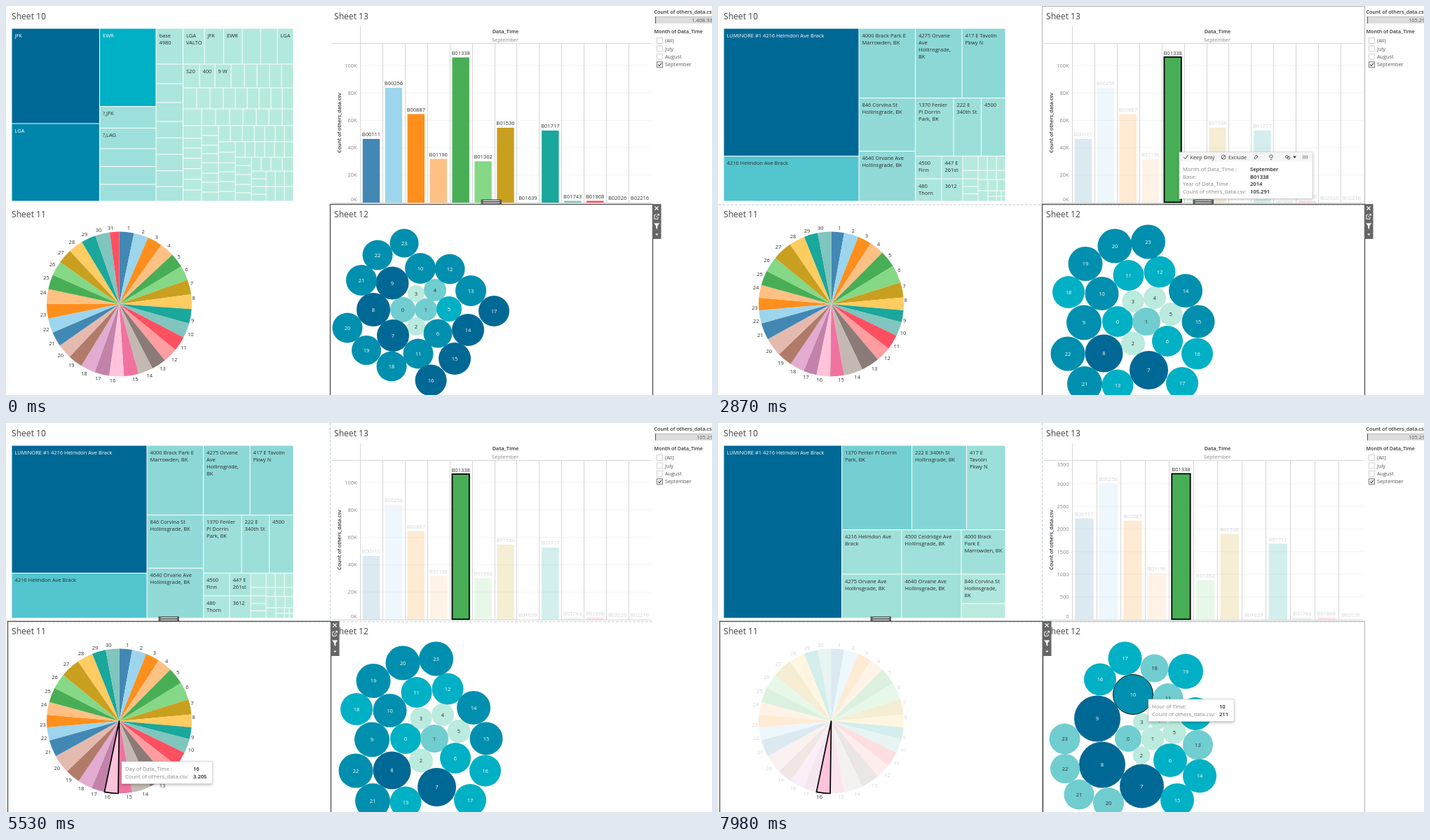
An HTML page with a canvas for the animation above (8 s loop, 1007 px wide and 556 px high).

```html
<!DOCTYPE html>
<html lang="en">
<head>
<meta charset="utf-8">
<title>Dashboard</title>
<style>
html, body { margin: 0; width: 100%; height: 100%; overflow: hidden; background: #fff; }
canvas { display: block; }
</style>
</head>
<body>
<canvas id="stage" width="1007" height="556"></canvas>
<script>
const g = document.getElementById('stage').getContext('2d');
const FONT = '"Open Sans", "Noto Sans", sans-serif';
const PAL = ['#4288b4', '#9dd5ed', '#ff8f1c', '#ffc083', '#48ae56', '#85d886', '#c99f1f', '#ffcc61', '#1aa79c', '#80c5be',
  '#ff5062', '#ff9da0', '#8b7b78', '#c4b9b2', '#f0739f', '#ffc3da', '#c382aa', '#e3abd0', '#b17b69', '#e4baaf'];
const SHADE = ['#006895', '#008fae', '#00b0c5', '#70cdd0', '#bbeade'];
const INK = '#333', FADED = '#d3d3d3';

const lerp = (a, b, p) => a + (b - a) * p;
const ease = u => { u = Math.min(1, Math.max(0, u)); return u * u * (3 - 2 * u); };
const rgb = c => [1, 3, 5].map(i => parseInt(c.slice(i, i + 2), 16));
const mix = (a, b, p) => {
  const to = rgb(b);
  return 'rgb(' + rgb(a).map((v, i) => Math.round(lerp(v, to[i], p))) + ')';
};
const onTile = c => c.startsWith('#00') ? '#fff' : '#2b2b2b';
const thousands = n => String(Math.round(n)).replace(/\B(?=(\d{3})+$)/g, '.');

function text(s, x, y, size = 7.5, color = INK, align = 'left', weight = 400) {
  g.font = `${weight} ${size}px ${FONT}`;
  g.textAlign = align;
  g.fillStyle = color;
  g.fillText(s, x, y + size * .36);
}
function box(x0, y0, x1, y1, fill, stroke, width = 1) {
  if (fill) { g.fillStyle = fill; g.fillRect(x0, y0, x1 - x0, y1 - y0); }
  if (stroke) { g.strokeStyle = stroke; g.lineWidth = width; g.strokeRect(x0, y0, x1 - x0, y1 - y0); }
}
function path(color, width, ...pts) {
  g.beginPath();
  for (let i = 0; i < pts.length; i += 2) g.lineTo(pts[i], pts[i + 1]);
  g.strokeStyle = color;
  g.lineWidth = width;
  g.stroke();
}
function shape(color, ...pts) {
  g.beginPath();
  for (let i = 0; i < pts.length; i += 2) g.lineTo(pts[i], pts[i + 1]);
  g.fillStyle = color;
  g.fill();
}

// ---- treemaps: tiles are [x0, y0, x1, y1, color, label]
const row = (y0, y1, xs, c, labels = []) => xs.slice(1).map((x, i) => [xs[i], y0, x, y1, c, labels[i]]);
const col = (x0, x1, ys, c, labels = []) => ys.slice(1).map((y, i) => [x0, ys[i], x1, y, c, labels[i]]);
const PALE = '#b7eadf';
const mapAll = [
  [8, 32, 133.5, 168, '#006895', 'JFK'], [8, 168, 133.5, 279, '#0085ab', 'LGA'], [133.5, 32, 214, 143.5, '#00b0c5', 'EWR'],
  ...col(133.5, 214, [143.5, 174.5, 204, 229.5, 255, 279], '#9de0db', ['?,JFK', '?,LAG']),
  ...col(214, 252.5, [32, 83, 111, 138, 165, 188.5, 212, 235.5, 258, 279], '#abe5dc', ['base|4980']),
  ...row(32, 83, [252.5, 283, 310.5, 337, 363, 387, 410], '#b2e8de', ['LGA|VALTO', 'JFK', 'EWR', '', '', 'LGA']),
  ...row(83, 117, [252.5, 276, 298, 321, 340, 358, 376, 393, 410], '#b5e9de', ['S20', '400', '9 W']),
  ...row(117, 147, [252.5, 272, 291, 310, 327, 344, 361, 378, 394, 410], PALE),
  ...col(252.5, 279, [147, 171, 189, 203, 217.5, 232.5, 247.5, 263, 279], PALE),
  ...row(147, 171, [279, 299, 319, 338, 357, 375, 394, 410], PALE),
  ...col(279, 303, [171, 185, 199, 211, 224, 239, 252, 266, 279], PALE),
  ...row(171, 194, [303, 320, 337, 354, 369, 384, 397, 410], PALE),
  ...col(303, 327, [194, 209, 224, 237, 251, 265, 279], PALE),
  ...row(194, 216, [327, 341, 355, 369, 383, 397, 410], PALE),
  ...col(327, 350, [216, 228, 241, 255, 267, 279], PALE),
  ...row(216, 236, [350, 364, 378, 394, 410], PALE),
  ...col(350, 371, [236, 247, 258, 269, 279], PALE),
  ...row(236, 258, [371, 384, 397, 410], PALE), ...row(258, 279, [371, 384, 397, 410], PALE)
];
const TOP = 'LUMINORE #1 4216 Helmdon Ave Brack';
const mapBase = [
  [8, 32, 201, 214.5, '#006895', TOP], [8, 214.5, 201, 279, '#52c5cf', '4216 Helmdon Ave Brack'],
  ...row(32, 131.5, [201, 281.5, 348, 410], '#8cd8d6',
    ['4000 Brack Park E|Marrowden, BK', '4275 Orvane|Ave|Hollinsgrade,|BK', '417 E Tavolin|Pkwy N']),
  ...col(201, 281.5, [131.5, 207.5, 279], '#92dad7', ['846 Corvina St|Hollinsgrade, BK', '4640 Orvane Ave|Hollinsgrade, BK']),
  ...row(131.5, 214.5, [281.5, 336, 375.5, 410], '#9cdfd9', ['1370 Fenler|Pl Dorrin|Park, BK', '222 E|340th St', '4500']),
  ...row(214.5, 247, [281.5, 319, 349], '#a9e4dc', ['4500|Finn', '447 E|261st']),
  ...row(247, 279, [281.5, 319, 349], '#ade6dd', ['480|Thorn', '3612']),
  ...col(349, 371, [214.5, 235, 247, 258, 268.5, 279], PALE),
  ...row(214.5, 235, [371, 384, 397, 410], PALE), ...row(235, 248, [371, 384, 397, 410], PALE),
  ...row(248, 264, [371, 385, 398, 410], PALE), ...row(264, 272, [385, 397, 404, 410], PALE),
  ...row(272, 279, [385, 397, 404, 410], PALE), [371, 264, 385, 279, PALE]
];
const mapDay = [
  [8, 32, 176.5, 279, '#006895', TOP],
  [176.5, 32, 276.5, 152.5, '#74cfd2', '1370 Fenler Pl Dorrin|Park, BK'],
  [276.5, 32, 354.5, 152.5, '#84d6d6', '222 E 340th St|Hollinsgrade, BK'],
  [354.5, 32, 410, 152.5, '#9adfd9', '417 E|Tavolin|Pkwy N'],
  ...row(152.5, 216, [176.5, 262, 347, 410], '#9fe1da',
    ['4216 Helmdon Ave|Brack', '4500 Celdridge Ave|Hollinsgrade, BK', '4000 Brack|Park E|Marrowden, BK']),
  ...row(216, 279, [176.5, 262, 347], '#a0e1da', ['4275 Orvane Ave|Hollinsgrade, BK', '4640 Orvane Ave|Hollinsgrade, BK']),
  [347, 216, 410, 258, '#afe7dd', '846 Corvina St|Hollinsgrade,|BK'], [347, 258, 410, 279, '#bbeade']
];
const baseFrom = mapBase.map((_, i) => i == 0 ? 21 : i == 1 ? 46 : 23 + 2 * i);
const dayFrom = [0, 7, 8, 4, 1, 9, 2, 3, 6, 5, 10];

function tile(x0, y0, x1, y1, fill) { box(x0 + .5, y0 + .5, x1 - .5, y1 - .5, fill); }
function treemap(from, to, src, p) {
  if (p == 0 || p == 1) {
    for (const [x0, y0, x1, y1, c, label] of p ? to : from) {
      tile(x0, y0, x1, y1, c);
      (label || '').split('|').forEach((s, i) => text(s, x0 + 4.5, y0 + 10 + i * 10, 7.5, onTile(c)));
    }
    return;
  }
  to.forEach((b, i) => {
    const a = from[src[i]];
    tile(...[0, 1, 2, 3].map(k => lerp(a[k], b[k], p)), mix(a[4], b[4], p));
  });
  g.globalAlpha = Math.max(0, 1 - 1.58 * p);
  from.forEach((a, i) => src.includes(i) || tile(...a));
  g.globalAlpha = 1;
}

// ---- bubbles by hour: [x, y, r, shade]
const bubAll = [[566, 434, 18, 3], [599, 434, 16, 3], [585, 458, 13, 4], [585, 411, 12, 4], [612, 406, 16, 3], [632, 433, 18, 2],
  [616, 468, 20.5, 1], [552, 471, 23, 0], [524, 434, 24, 0], [551, 396, 23.5, 0], [591, 375, 22, 1], [588, 497, 21.5, 1],
  [633, 376, 21.5, 1], [663, 407, 22, 1], [659, 463, 23, 0], [640, 504, 23, 0], [606, 535, 22.5, 0], [696, 436, 22, 0],
  [550, 515, 21.5, 1], [514, 492, 21, 1], [487, 460, 21.5, 1], [507, 392, 22, 1], [530, 356, 21.5, 1], [568, 339, 20.5, 1]];
const bubBase = [[570, 451, 22, 2], [611, 451, 20, 3], [592, 482.5, 17, 4], [592, 422, 15.5, 4], [623, 417, 16, 4], [646, 440.5, 16.5, 4],
  [641, 479, 22, 2], [614.5, 520.5, 27.5, 0], [550.5, 496.5, 27, 0], [522, 452.5, 25, 1], [547.5, 411, 24, 1], [585.5, 385, 22, 2],
  [630, 380, 22.5, 2], [570, 542, 22.5, 2], [667, 407, 24, 1], [685, 451, 23.5, 1], [683.5, 497, 22.5, 2], [662, 539, 23, 2],
  [500, 409, 23, 2], [524, 368.5, 24.5, 1], [566, 343, 24.5, 1], [523, 540, 25, 1], [499, 497, 24.5, 1], [613.5, 337, 24.5, 1]];
const bubDay = [[585, 451, 19, 3], [620, 451, 16.5, 4], [604, 475, 12.5, 4], [604.5, 427, 12.5, 4], [628.5, 425, 12.5, 4], [651, 442, 16.5, 4],
  [645, 482, 24, 2], [604.5, 519, 31.5, 0], [548, 488.5, 33, 0], [541, 422.5, 33, 0], [592, 388, 28.5, 1], [642, 393.5, 21.5, 3],
  [681, 415.5, 23.5, 2], [684.5, 460, 21.5, 3], [687, 504.5, 24, 2], [655, 539, 24, 2], [545, 366.5, 23, 2], [580.5, 336.5, 24, 2],
  [622.5, 350.5, 20, 3], [667, 355, 25, 2], [557, 543, 22, 3], [515, 531, 21.5, 3], [495, 494, 21, 3], [494.5, 451.5, 22, 3]];

function bubbles(from, to, p, hover) {
  from.forEach((a, i) => {
    const b = to[i], [x, y, r] = [0, 1, 2].map(k => lerp(a[k], b[k], p));
    g.beginPath();
    g.arc(x, y, r, 0, 7);
    g.fillStyle = mix(SHADE[a[3]], SHADE[b[3]], p);
    g.fill();
    if (i === hover) { g.strokeStyle = '#111'; g.lineWidth = 1; g.stroke(); }
    if (p == 0 || p == 1) text(i, x, y, 7.5, onTile(SHADE[(p ? b : a)[3]]), 'center');
  });
}

// ---- pie by day
const CX = 161.5, CY = 426, R = 103.5;
const endsAll = Array.from({ length: 31 }, (_, i) => i < 30 ? (i + 1) * 11.75 : 360);
const endsBase = [10.3, 21.9, 33, 44.8, 58.3, 72.5, 84.7, 95, 104.5, 116, 128, 140, 154.6, 169.8, 180.8, 191.758, 202.4, 214, 226, 241,
  254.4, 265, 275, 285.3, 297.2, 309.502, 325.4, 338.2, 349.2, 360];
const dayCount = d => (endsBase[d - 1] - (endsBase[d - 2] || 0)) / 360 * 105291;

function pie(ends, hover, selected, faded) {
  const slice = i => {
    const rad = a => (a - 90) * Math.PI / 180;
    g.beginPath();
    g.moveTo(CX, CY);
    g.arc(CX, CY, R, rad(ends[i - 1] || 0), rad(ends[i]));
    g.closePath();
  };
  ends.forEach((end, i) => {
    const dim = faded && i + 1 !== selected;
    slice(i);
    g.globalAlpha = dim ? .19 : 1;
    g.fillStyle = PAL[i % 20];
    g.fill();
    g.globalAlpha = 1;
    const mid = ((ends[i - 1] || 0) + end) / 2 * Math.PI / 180, dx = Math.sin(mid), dy = -Math.cos(mid);
    text(i + 1, CX + dx * R + Math.sign(dx) * (i < 9 ? 2.7 : 5.5), CY + dy * R + Math.sign(dy) * 5.5, 7.5, dim ? FADED : INK, 'center');
  });
  g.lineJoin = 'round';
  for (const [d, w] of [[hover, .9], [selected, 1.7]]) if (d) {
    slice(d - 1);
    g.strokeStyle = '#000';
    g.lineWidth = w;
    g.stroke();
  }
  g.lineJoin = 'miter';
}

// ---- bars
const BASES = ['B00111', 'B00256', 'B00887', 'B01196', 'B01338', 'B01362', 'B01536', 'B01639', 'B01717', 'B01743', 'B01868', 'B02026', 'B02216'];
const topsBase = [190, 117, 154.5, 218.5, 73.5, 222, 174, 281, 178, 278.5, 278.5, 281, 281];
const topsDay = [136.5, 87, 139.5, 214.5, 73, 224.5, 158.5, 281, 172.5, 278.5, 278.5, 281, 281];

function bars(p, hovered, selected, faded) {
  const pitch = lerp(31.92, 34.55, p), half = lerp(12.2, 13.2, p), n = p ? 12 : 13;
  text('Data_Time', 712.5, 36, 7.4, INK, 'center', 600);
  text('September', 712, 48, 7.4, '#888', 'center');
  const step = p ? 32.35 : 39.2;
  for (let k = 0; k <= (p ? 7 : 5); k++) {
    const y = 281 - k * step;
    if (k && y > 60) path('#f4f4f4', 1, 505, y, 920, y);
    text(p ? k * 500 : k * 20 + 'K', 500.5, Math.max(59, Math.min(276, y)), 7.4, '#888', 'right');
  }
  path('#d6d6d6', 1, 465, 53.5, 920, 53.5);
  for (let i = 0; i < n; i++) {
    const x = Math.round(505 + i * pitch) + .5;
    path('#d6d6d6', 1, x, i ? 53 : 29, x, 281);
  }
  path('#d6d6d6', 1, 465, 281.5, 920, 281.5);
  g.save();
  g.translate(475, 167);
  g.rotate(-Math.PI / 2);
  text('Count of others_data.csv', 0, 0, 7.2, INK, 'center', 600);
  g.restore();
  for (let i = 0; i < n; i++) {
    const x = 505 + (i + .5) * pitch, y = lerp(topsBase[i], topsDay[i], p), dim = faded && i != 4;
    g.globalAlpha = dim ? .19 : 1;
    box(x - half, y, x + half, 281, PAL[i]);
    g.globalAlpha = 1;
    if (i == 4 && (hovered || selected)) box(x - half, y - .5, x + half, 280.5, null, '#000', selected ? 1.8 : .9);
    text(BASES[i], x, y - 6.5, 7.5, dim ? FADED : INK, 'center');
  }
}

// ---- side panel and sheet frames
function filters(total, x) {
  text('Count of others_data.csv', 924.5, 8.5, 7.2, INK, 'left', 600);
  box(927, 15, 1007, 25, '#dcdcdc');
  path('#bbb', 1, 927, 15.5, 1007, 15.5);
  path('#555', 1, 926.5, 15, 926.5, 25);
  text(total, x, 20.5, 7.5, '#555');
  text('Month of Data_Time', 924.5, 36.5, 7.1, INK, 'left', 600);
  ['(All)', 'July', 'August', 'September'].forEach((s, i) => {
    const y = 49.5 + i * 11.4, on = i == 3;
    box(928.5, y - 4, 936.5, y + 4, '#fff', on ? '#777' : '#d0d0d0');
    if (on) path('#333', 1.1, 930.3, y, 932, y + 2, 935, y - 2.2);
    text(s, 940, y, 7.3, '#555');
  });
}
const SHEETS = { 11: [2.5, 283.5, 463.5, 560], 12: [462.5, 283.5, 922.5, 560], 13: [462.5, .5, 922.5, 283.5] };

function frames(active, hover, dashed) {
  if (dashed) {
    g.setLineDash([4, 2]);
    path('#c3ced6', 1, 462.5, 0, 462.5, 283);
    path('#c3ced6', 1, 0, 284, 922, 284);
    g.setLineDash([]);
  }
  if (hover) box(...SHEETS[hover], null, '#b4b4b4');
  box(...SHEETS[active], null, '#555', 1.4);
  const x = active == 12 ? 922 : 463, h = active == 12 ? 677.5 : 217.5;
  box(h, 276.5, h + 29.5, 283, '#5c5c5c');
  path('#fff', 1, h + 3, 278.5, h + 26.5, 278.5);
  path('#fff', 1, h + 3, 281.5, h + 26.5, 281.5);
  box(x, 283, x + 12.5, 333, '#666');
  path('#fff', 1.1, x + 3.5, 286.5, x + 8.5, 291.5);
  path('#fff', 1.1, x + 8.5, 286.5, x + 3.5, 291.5);
  path('#fff', .9, x + 5.5, 298.5, x + 2.8, 298.5, x + 2.8, 304.5, x + 8, 304.5, x + 8, 301.5);
  path('#fff', .9, x + 5, 302, x + 9.3, 297.7, x + 9.3, 300);
  path('#fff', .9, x + 6.8, 297.5, x + 9.5, 297.5);
  shape('#fff', x + 2, 310.5, x + 10.3, 310.5, x + 7.2, 314.5, x + 7.2, 319, x + 5.2, 317.5, x + 5.2, 314.5);
  shape('#fff', x + 4, 325.5, x + 8.5, 325.5, x + 6.2, 328);
}

// ---- tooltip
function tooltip(x, y, rows, valueX, tools) {
  const head = tools ? 13.5 : 0;
  g.font = `600 7.6px ${FONT}`;
  const w = tools ? 190 : valueX + 8 + Math.max(...rows.map(r => g.measureText(r[1]).width));
  const h = head + 10.4 + rows.length * 10.6;
  g.save();
  g.shadowColor = 'rgba(0,0,0,.3)';
  g.shadowBlur = 4;
  g.shadowOffsetY = 1;
  box(x, y, x + w, y + h, '#fff');
  g.restore();
  box(x, y, x + w, y + h, null, '#d5d5d5', .8);
  rows.forEach(([k, v], i) => {
    const ry = y + head + 10.6 + i * 10.7;
    text(k, x + 5, ry, 7.7, '#868686');
    text(v, x + valueX, ry, 7.6, '#222', 'left', 600);
  });
  if (!tools) return;
  const m = y + 7;
  box(x + .5, y + .5, x + w - .5, y + head, '#f5f5f5');
  path('#444', 1, x + 6, m, x + 8.5, m + 2.5, x + 12.5, m - 3);
  text('Keep Only', x + 15.5, m, 7.3);
  text('Exclude', x + 70, m, 7.3);
  const ring = (cx, cy, r) => { g.beginPath(); g.arc(cx, cy, r, 0, 7); g.strokeStyle = '#555'; g.lineWidth = .9; g.stroke(); };
  ring(x + 63, m, 3);
  path('#555', .9, x + 61, m + 2, x + 65, m - 2);
  path('#555', .9, x + 107, m + 1, x + 110, m - 3, x + 112, m - 1, x + 108.5, m + 3, x + 107, m + 1);
  ring(x + 131, m - 1, 2.3);
  path('#555', .9, x + 130, m + 3.5, x + 132, m + 3.5);
  ring(x + 153.5, m - .5, 2);
  ring(x + 156, m + 1, 2);
  shape('#222', x + 162, m - 1.2, x + 167, m - 1.2, x + 164.5, m + 1.6);
  for (let i = 0; i < 4; i++) path('#777', .8, x + 176.5 + i * 2, m - 2.5, x + 176.5 + i * 2, m + 2.5);
}

// ---- pointer track: [time, x, y]
const TRACK = [[0, 648, 199], [3150, 648, 199], [3290, 440, 410], [3430, 300, 395], [3500, 230, 385], [3570, 230, 385], [3920, 128, 399],
  [4060, 100, 420], [4200, 100, 420], [4410, 112, 450], [4480, 112, 450], [4970, 155, 474], [6720, 155, 474], [7000, 480, 470],
  [7420, 600, 389], [7490, 600, 389], [7630, 608, 390], [7840, 604, 385], [8000, 604, 385]];
function pointer(t) {
  const i = TRACK.findIndex(k => k[0] > t), a = TRACK[i - 1], b = TRACK[i], p = (t - a[0]) / (b[0] - a[0]);
  return [lerp(a[1], b[1], p), lerp(a[2], b[2], p)];
}

function draw(t) {
  const [mx, my] = pointer(t);
  const p1 = t < 2660 ? 0 : ease((t - 2549) / 300);
  const p2 = t < 6300 ? 0 : ease((t - 6260) / 360);
  const overBar = t >= 2240 && t < 3150, barPicked = t >= 2520;
  const dayPicked = t >= 5530 ? 16 : 0;
  let day = 0, hour = -1;
  if (t >= 3290 && t < 6230 && Math.hypot(mx - CX, my - CY) < R) {
    const angle = (Math.atan2(mx - CX, CY - my) * 180 / Math.PI + 360) % 360;
    day = endsBase.findIndex(e => angle < e) + 1;
  }
  if (t >= 7000) hour = bubDay.findIndex(b => Math.hypot(mx - b[0], my - b[1]) < b[2]);

  box(0, 0, 1007, 556, '#fff');
  [[10, 8, 15], [13, 468, 15], [11, 8, 298], [12, 468, 298]].forEach(([n, x, y]) => text('Sheet ' + n, x, y, 12.1, '#444'));
  if (p2) treemap(mapBase, mapDay, dayFrom, p2);
  else treemap(mapAll, mapBase, baseFrom, p1);
  pie(t < 2660 ? endsAll : endsBase, dayPicked ? 0 : day, dayPicked, t >= 6230);
  bars(p2, overBar, barPicked, t >= 2660);
  if (p2) bubbles(bubBase, bubDay, p2, hour);
  else bubbles(bubAll, bubBase, p1, -1);
  if (barPicked) filters('105.291', 985);
  else filters('1.408.930', 978);
  const hover = overBar ? 13 : t >= 3290 && t < 5530 ? 11 : t >= 7000 ? 12 : 0;
  frames(dayPicked ? 11 : 12, hover, t >= 2240);

  const count = 'Count of others_data.csv:';
  if (overBar) tooltip(mx + 10, my + 10, [['Month of Data_Time :', 'September'], ['Base:', 'B01338'],
    ['Year of Data_Time :', '2014'], [count, '105.291']], 101, barPicked);
  if (day) tooltip(mx + 10, my + 10, [['Day of Data_Time :', day], [count, thousands(dayCount(day))]], 102);
  if (hour >= 0) tooltip(mx + 10, my + 10, [['Hour of Time:', hour], [count, Math.round(211 * (bubDay[hour][2] / 28.5) ** 2)]], 101);
}

const start = performance.now();
function tick(now) {
  const t = Math.max(0, now - start) % 8000;
  draw(Math.floor(t / 70) * 70);
  requestAnimationFrame(tick);
}
draw(0);
requestAnimationFrame(tick);
</script>
</body>
</html>
```
